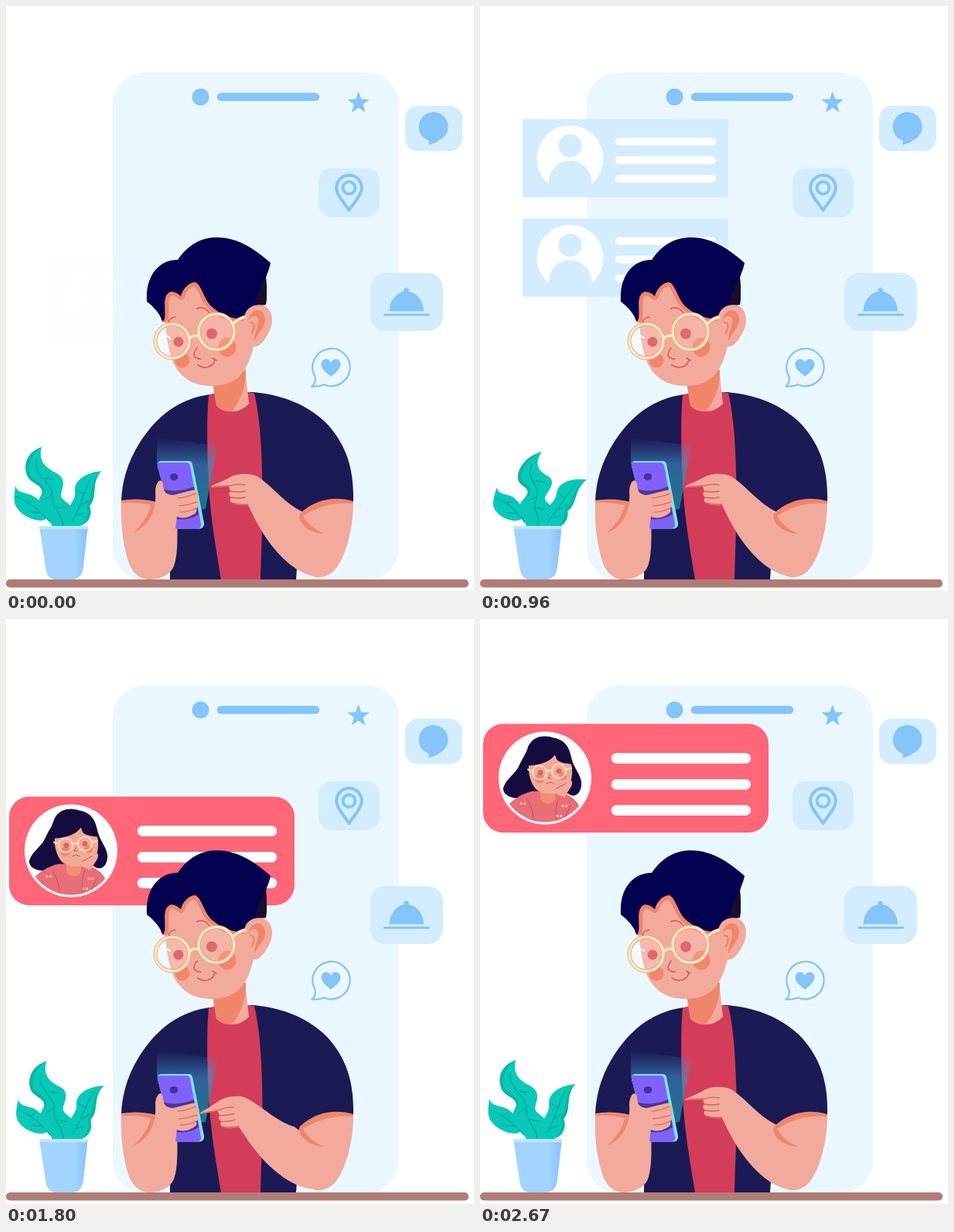
Write an HTML page that moves like this. It is 605x756 px and loops after 2.7 s.

```html
<!DOCTYPE html>
<html lang="en">
<head>
<meta charset="utf-8">
<title>Choosing a profile</title>
<style>
html, body { margin: 0; width: 100%; height: 100%; overflow: hidden; background: #fff; }
svg { display: block; width: 605px; height: 756px; }
</style>
</head>
<body>
<svg viewBox="0 0 605 756" fill="none" stroke-linecap="round" stroke-linejoin="round">
  <defs>
    <linearGradient id="glow" x1="0" y1="558" x2="0" y2="645" gradientUnits="userSpaceOnUse">
      <stop offset="0" stop-color="#3f8fc8" stop-opacity="0"/>
      <stop offset=".4" stop-color="#3f8fc8" stop-opacity=".6"/>
      <stop offset="1" stop-color="#1c8a96" stop-opacity=".8"/>
    </linearGradient>
    <linearGradient id="pot" x1="43" x2="106" y1="0" y2="0" gradientUnits="userSpaceOnUse">
      <stop offset=".72" stop-color="#a2d4ff"/>
      <stop offset=".92" stop-color="#8fc6fa"/>
    </linearGradient>
    <clipPath id="avatar"><circle cx="84" cy="70" r="57"/></clipPath>
    <g id="row">
      <rect x="55" width="266" height="101" fill="#d3edff"/>
      <circle cx="116.500" cy="51" r="43" fill="#fff"/>
      <circle cx="116.500" cy="34.500" r="15" fill="#d3edff"/>
      <path d="M89 96V81A27.500 27.500 0 0 1 144 81V96Z" fill="#d3edff"/>
      <path d="M180 29H300M180 53H300M180 77H300" stroke="#fff" stroke-width="10"/>
    </g>
  </defs>

  <rect x="138" y="86" width="370" height="655" rx="40" fill="#ebf7ff"/>
  <circle cx="251.500" cy="117.500" r="11" fill="#84c5fa"/>

  <g fill="#d3edff">
    <rect x="516" y="129" width="74" height="58.500" rx="16"/>
    <rect x="404" y="209.500" width="79" height="63.500" rx="17"/>
    <rect x="470.500" y="345" width="94.500" height="75" rx="20"/>
  </g>
  <g fill="#84c5fa">
    <path id="star"/>
    <path d="M546.500 179.500L546.500 174A19 19 0 1 1 560 173.500Q554 178 546.500 179.500Z"/>
    <path d="M495.500 394.500A22.200 26 0 0 1 514.500 369A3.400 3.400 0 1 1 520.500 369A22.200 26 0 0 1 540 394.500Z"/>
    <path d="M420 479C413 473 407.500 469 407.500 463C407.500 455 417 454 420 460.500C423 454 432.500 455 432.500 463C432.500 469 427 473 420 479Z"/>
  </g>
  <g stroke="#84c5fa">
    <path d="M489.500 399H546.500" stroke-width="3.200"/>
    <path d="M443.500 264C438 255 427.200 245 427.200 235A16.300 16.300 0 0 1 459.800 235C459.800 245 449 255 443.500 264Z" stroke-width="4"/>
    <circle cx="443.500" cy="235" r="8" stroke-width="4"/>
    <path d="M395.500 491.500C400 488 400.500 484 399.500 479A24.200 24.200 0 1 1 411 489.200C406 491.500 400 492 395.500 491.500Z" stroke-width="2.300"/>
  </g>

  <use id="row1" href="#row"/>
  <use id="row2" href="#row"/>
  <path d="M278 117.500H400" stroke="#84c5fa" stroke-width="10.500"/>

  <g id="pick">
    <rect x="4" width="369" height="140.500" rx="26" fill="#ff6677"/>
    <path d="M176.500 44.500H343.500M176.500 78.200H343.500M176.500 111.800H343.500" stroke="#fff" stroke-width="13.500"/>
    <circle cx="84" cy="70" r="60" fill="#fff"/>
    <g clip-path="url(#avatar)">
      <path d="M61 33C66 15 84 14 95 18C108 20 115 28 118 43C121 58 133 68 131 80C129 94 119 95 114 90L62 92C46 101 29 93 30 83C34 70 46 65 51 53C55 44 58 41 61 33Z" fill="#150b3f"/>
      <path d="M33 108C42 98 54 90 68 87H100C116 91 128 99 130 112L120 135H40Z" fill="#e86f78"/>
      <path d="M78 85H97V98Q88 108 78 98Z" fill="#f0906f"/>
      <path d="M63 54C80 53 91 48 97 40L99 46C104 51 112 51 118 52C121 64 118 76 113 83C103 92 81 93 72 84C66 77 62 65 63 54Z" fill="#f2a998"/>
      <g fill="#f0876b"><circle cx="77" cy="71" r="6"/><circle cx="107" cy="68" r="5"/></g>
      <g fill="#e0626b"><circle cx="78" cy="63" r="3.500"/><circle cx="102" cy="61" r="3.500"/></g>
      <g stroke="#fbe0b5" stroke-width="2">
        <circle cx="77" cy="63" r="9"/><circle cx="102" cy="61" r="9"/>
        <path d="M86 61L93 60M68 61L62 59M111 59L118 57"/>
      </g>
      <path d="M97 82C103 78 108 73 114 71C121 72 120 79 116 84L109 95L97 90C91 86 94 83 97 82Z" fill="#f2a998"/>
      <g stroke="#c9525e" stroke-width="1">
        <path d="M86 77Q91 74 95 77M91 66L88 70H92M98 84L111 77M60 96Q69 110 70 126M102 95Q96 110 99 126M46 110Q49 119 46 128M118 105Q110 117 110 126"/>
      </g>
      <g stroke="#ffc3b5" stroke-width="3" stroke-dasharray=".1 4.500">
        <path d="M53 103H60M107 106H114M41 115H49M100 119H108"/>
      </g>
    </g>
  </g>

  <!-- body -->
  <path d="M264 502C224 507 195 530 173 564C156 591 150 616 149 640Q172 636 196 642L212 680V741H375L381 656C400 640 425 636 449 641C450 602 442 570 416 541C390 514 354 502 320 499Z" fill="#1b1a54"/>
  <path d="M262 503L270 500H321C328 530 331 570 331.500 625C332 665 330 700 329 741H278C272 705 265 665 262.500 625C260 580 259 535 262 503Z" fill="#d43d59"/>
  <path d="M267 486L309 468L314 514Q305 524 291 524Q276 523 272 516Z" fill="#f2aa9c"/>
  <path d="M267 486L310 470Q311 500 292 524Q276 523 272 516Z" fill="#f0856a"/>
  <path d="M195 592V558L273 568L258 650L244 652L240 592Z" fill="url(#glow)"/>

  <!-- head -->
  <path d="M206 384C205 412 208 436 213 452C220 476 238 491 265 491C296 491 311 477 320 440L330 388L290 350L230 345Z" fill="#f2aa9c"/>
  <path d="M205 404C207 390 201 374 213 369Q220 369 226 375C229 364 237 357 245 357C255 363 255 381 269 391C281 401 294 404 305 402" stroke="#f0856a" stroke-width="10"/>
  <path d="M182 382C180 348 198 328 222 328C235 309 252 299 272 299C303 299 326 318 342 332C340 342 337 346 336 352Q338 370 336 386Q321 386 313 394L307 405C294 404 281 401 269 391C255 381 255 363 245 357C237 357 229 364 226 375Q220 369 213 369C201 374 207 390 205 404L203 408Q196 392 182 382Z" fill="#02004f"/>
  <path d="M336 350Q338 370 336 386Q328 386 321 389Q325 368 336 350Z" fill="#190c2d"/>
  <path d="M309 398C313 387 326 384 335 388C346 394 346 411 340 421C334 433 327 442 319 440C312 438 306 414 309 398Z" fill="#f2aa9c"/>
  <path d="M313 408C315 389 336 388 335 407C334 417 325 423 321 433C320 422 327 414 326 405C324 398 316 400 313 408Z" fill="#f0856a"/>
  <path d="M316 409Q324 409 318 423" stroke="#f0856a" stroke-width="2.500"/>
  <g fill="#f2866c">
    <circle cx="228" cy="458" r="9.500"/><ellipse cx="286" cy="441" rx="11.500" ry="12.500"/>
  </g>
  <circle cx="215" cy="433" r="21" fill="#fff" opacity=".18"/>
  <circle cx="272" cy="421" r="22" fill="#fff" opacity=".12"/>
  <g fill="#de696b"><circle cx="223" cy="434" r="6.500"/><circle cx="266" cy="423.500" r="7"/></g>
  <path d="M210 409Q212 402 219 402M247 391Q257 387 264 398M247 442C240 451 243 456 252 456M248 464C256 470 268 467 270 457M267 455L272 458" stroke="#d8605c" stroke-width="1.700"/>
  <g id="specs">
    <g stroke="#e9a873" stroke-width="5">
      <circle cx="215" cy="433" r="22"/><circle cx="272" cy="421" r="23"/>
      <path d="M237 430Q243 424 249 427M293 411Q301 404 309 402"/>
    </g>
    <g stroke="#fde8c9" stroke-width="3.200">
      <circle cx="215" cy="433" r="22"/><circle cx="272" cy="421" r="23"/>
      <path d="M237 430Q243 424 249 427M293 411Q301 404 309 402"/>
    </g>
    <path d="M197 431Q206 423 212 429" stroke="#fff" stroke-width="2"/>
  </g>

  <!-- arm with phone -->
  <path d="M149 639Q172 635 194 641L193 626C194 615 201 610 204 618L215 630L221 660C222 690 222 710 217 724C211 737 197 741 184 741C170 740 161 729 157 714C150 690 148 664 149 639Z" fill="#f2aa9c"/>
  <path d="M149 640Q172 635 193 642C190 660 181 674 164 681C178 668 185 656 187 645Q168 640 149 642Z" fill="#f0856a"/>
  <path d="M200 588H236Q240 588 241 592L256 668Q257 674 251 675.500H222Q217 676 216 671L196 595Q195 589 200 588Z" fill="#80e1f5"/>
  <path d="M199 590H233Q237 590 238 594L252 669Q253 674 248 675.500H222Q217 676 216 671L196 595Q195 590 199 590Z" fill="#8062fa"/>
  <path d="M201 624Q222 630 243 621L249 657Q236 665 220 663L204 633Z" fill="#4d3693"/>
  <ellipse cx="217" cy="608.500" rx="5.300" ry="4.500" fill="#46319d"/>
  <path d="M193 640L194 624C194 614 201 609 203 618C203 627 207 632 216 632L240 626Q247 624 246 629L249 632Q251 637 247 641Q250 646 246 649Q248 655 241 658Q230 664 221 660L219 675L195 675Z" fill="#f2aa9c"/>
  <path d="M245 630Q234 635 222 636M247 641Q236 645 224 646M246 649Q236 654 225 654" stroke="#d8605c" stroke-width="1.200"/>

  <!-- pointing arm -->
  <g id="arm">
    <path d="M266 620Q278 615 288 610C296 604 315 603 325 608C343 619 360 643 384 654L420 690L405 738C383 736 365 722 350 705C333 686 322 664 313 645Q298 646 292 642Q288 639 291 635Q286 631 290 627L288 621L268 622Q264 622 266 620Z" fill="#f2aa9c"/>
    <path d="M268 621L290 620Q299 617 309 619M290 627Q300 629 309 627M291 635Q301 637 309 635M291 642Q302 645 313 644" stroke="#d8605c" stroke-width="1.300"/>
  </g>
  <path d="M380 656C400 641 425 636 449 641C449 672 441 706 428 725C420 736 410 739 400 738L376 728L372 680Z" fill="#f2aa9c"/>
  <path d="M380 656C400 637 425 633 449 640L448 643C426 641 404 646 384 659C389 668 398 676 411 682C394 681 381 672 379 660Z" fill="#f0856a"/>

  <!-- plant -->
  <g id="leafL">
    <path d="M12 620C16 632 28 627 38 635C50 644 58 657 64 672Q57 669 52 662C48 669 22 663 13 647C9 639 11 629 12 620Z" fill="#07c9ba"/>
    <path d="M13 634Q30 640 43 653T62 671M27 642L35 639M31 654L45 655" stroke="#0ba596" stroke-width="1.300"/>
  </g>
  <g id="leafR">
    <path d="M123 601C104 603 88 612 89 627C91 640 76 648 74 673H91C106 671 113 659 108 646C119 635 109 617 123 601Z" fill="#07c9ba"/>
    <path d="M123 601C109 617 119 635 108 646Q113 659 100 669C106 660 107 653 104 645C114 633 106 615 123 601Z" fill="#0db5a4"/>
    <path d="M110 611C100 627 99 645 82 672M101 631L92 626M97 646L106 639M91 658L101 655" stroke="#0ba596" stroke-width="1.300"/>
  </g>
  <g id="leafM">
    <path d="M46 570C41 588 52 597 64 603C80 611 72 623 71 633C73 641 87 643 86 654L85 673H60C56 661 43 655 42 644C41 635 50 630 45 623C40 616 28 615 26 602C23 586 32 575 46 570Z" fill="#07c9ba"/>
    <path d="M46 570C32 575 23 586 26 602C28 615 40 616 45 623Q50 630 44 638C52 630 51 624 46 619C39 611 31 611 30 600C29 587 35 578 46 570Z" fill="#0db5a4"/>
    <path d="M39 587C36 608 61 616 60 634S72 652 74 672M51 610L63 612M60 631L50 638M65 647L77 649" stroke="#0ba596" stroke-width="1.300"/>
  </g>
  <path d="M43 672H106L100 725Q98 741 85 741H64Q53 741 51 725Z" fill="url(#pot)"/>
  <path d="M43 672H106L105.500 676H43.500Z" fill="#c3e5ff"/>

  <rect y="741" width="598" height="10.500" rx="5" fill="#b17c76"/>
</svg>
<script>
const LOOP = 2700;
const $ = id => document.getElementById(id);
const clamp = x => Math.min(1, Math.max(0, x));
const ramp = (t, a, b) => clamp((t - a) / (b - a));
const ease = x => (1 - Math.cos(Math.PI * x)) / 2;

// Smooth curve through [time, value] knots, flat at both ends.
function curve(knots, t) {
  const n = knots.length - 1;
  const slope = i => i <= 0 || i >= n ? 0 :
    (knots[i + 1][1] - knots[i - 1][1]) / (knots[i + 1][0] - knots[i - 1][0]);
  let i = 0;
  while (i < n - 1 && t > knots[i + 1][0]) i++;
  const [t0, v0] = knots[i], [t1, v1] = knots[i + 1];
  const h = t1 - t0, s = (t - t0) / h, r = 1 - s;
  return r * r * ((1 + 2 * s) * v0 + s * h * slope(i)) +
         s * s * ((3 - 2 * s) * v1 - r * h * slope(i + 1));
}

const sway = [[0, 0], [480, .83], [960, 1], [1290, .47], [1590, 0], [2010, .48], [2230, .55], [2680, 0], [LOOP, 0]];
const drift = [[0, 0], [480, .5], [960, 1], [1290, .8], [1560, .5], [2010, .3], [LOOP, 0]];

const set = (id, value) => $(id).setAttribute('transform', value);

// Shear and squash a leaf against the rim of the pot.
function lean(id, kx, ky) {
  set(id, `matrix(1 0 ${-kx} ${1 - ky} ${kx * 672} ${ky * 672})`);
}

function place(id, y, opacity) {
  set(id, `translate(0 ${y})`);
  $(id).setAttribute('opacity', opacity);
}

function draw(t) {
  place('row1', 329.3 - .1905 * t, ramp(t, 0, 240) * (1 - ramp(t, 1080, 1590)));
  place('row2', 362 - .2075 * (t - 540), ramp(t, 540, 780) * (1 - ramp(t, 1270, 1590)));
  place('pick', Math.max(135.5, 381.3 - .2105 * (t - 1080)), ramp(t, 1080, 1320));

  const reach = ease(ramp(t, 1080, 1620)) - ease(ramp(t, 2120, 2660));
  set('arm', `rotate(${-7.3 * reach} 397 742)`);

  const p = curve(sway, t), q = curve(drift, t);
  lean('leafM', .333 * p, .059 * p);
  lean('leafL', .19 * q, .04 * q);
  set('leafR', `rotate(${13 * p} 82 672)`);
}

const tips = [...Array(10).keys()].map(i => {
  const r = i % 2 ? 6.3 : 15, a = Math.PI * (i / 5 - .5);
  return [455.7 + r * Math.cos(a), 125.3 + r * Math.sin(a)];
});
$('star').setAttribute('d', 'M' + tips.join('L') + 'Z');

function tick() {
  draw(performance.now() % LOOP);
  requestAnimationFrame(tick);
}
draw(0);
requestAnimationFrame(tick);
</script>
</body>
</html>
```
